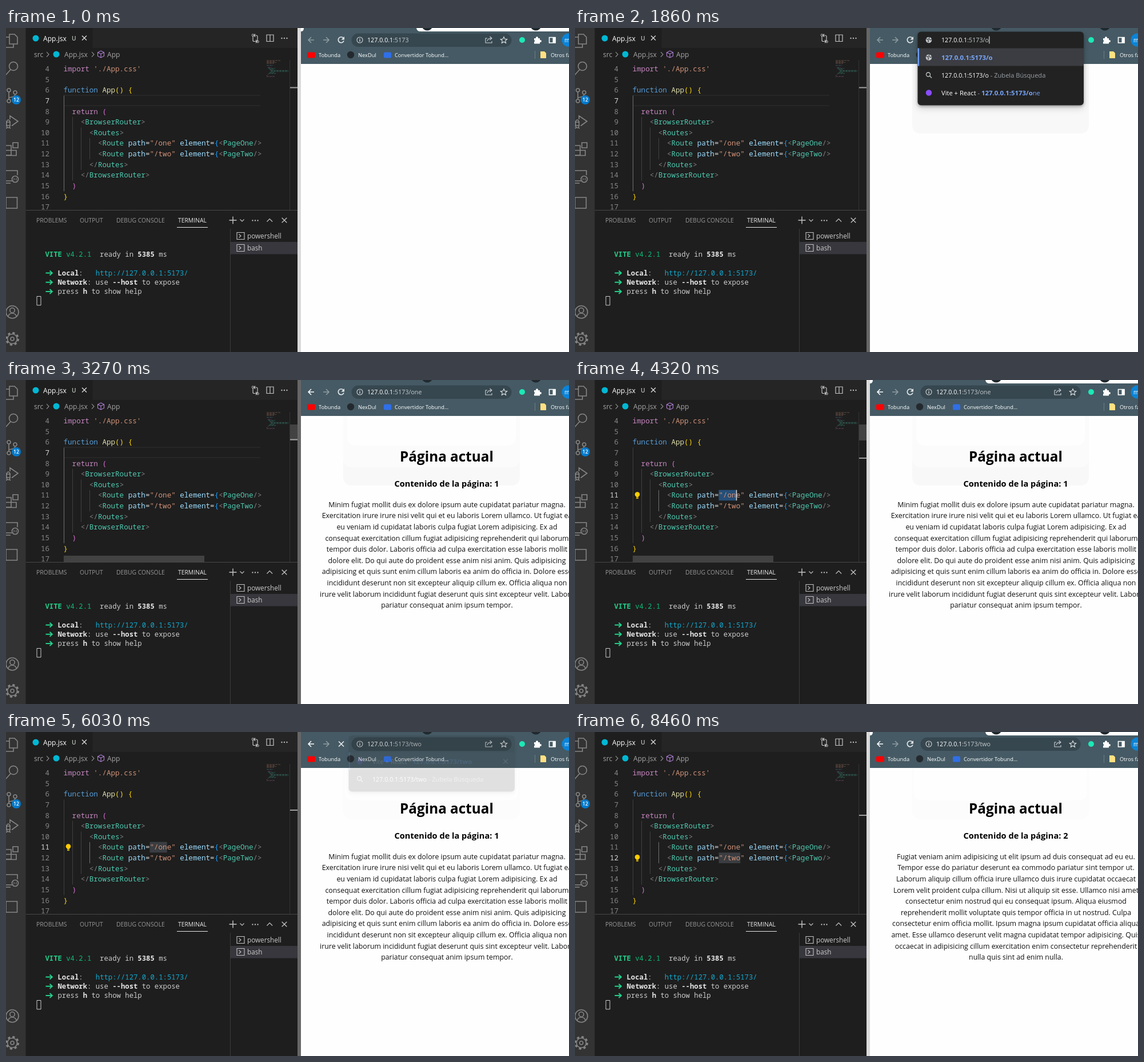
Write an HTML page that moves like this. It is 985 px wide and 568 px high and loops after 8490 ms.

```html
<!DOCTYPE html>
<html lang="es">
<head>
<meta charset="utf-8">
<title>Router demo</title>
<style>
html,body{margin:0;width:100%;height:100%;overflow:hidden;background:#1e1e1e}
svg{display:block;width:985px;height:568px}
text{white-space:pre;font-family:"Open Sans","Noto Sans",sans-serif}
.m{font-family:"Noto Sans Mono","DejaVu Sans Mono",monospace}
</style>
</head>
<body>
<svg id="stage" viewBox="0 0 985 568" xmlns="http://www.w3.org/2000/svg"></svg>
<script>
const LOOP = 8490, HOST = '127.0.0.1', PORT = ':5173', TEAL = '#455a64';
const stage = document.getElementById('stage');

const T = (x, y, s, size, fill, more = '') =>
  `<text x="${x}" y="${y}" font-size="${size}" fill="${fill}" ${more}>${s}</text>`;
const R = (x, y, w, h, fill, more = '') =>
  `<rect x="${x}" y="${y}" width="${w}" height="${h}" fill="${fill}" ${more}/>`;
const C = (x, y, r, fill, more = '') => `<circle cx="${x}" cy="${y}" r="${r}" fill="${fill}" ${more}/>`;
const ring = (x, y, r, stroke, w = 1.2, more = '') => C(x, y, r, 'none', `stroke="${stroke}" stroke-width="${w}" ${more}`);
const P = (d, stroke, w = 1.2, more = '') =>
  `<path d="${d}" fill="none" stroke="${stroke}" stroke-width="${w}" ${more}/>`;
const S = (fill, s, more = '') => `<tspan fill="${fill}" ${more}>${s}</tspan>`;
const G = (id, s = '') => `<g id="${id}">${s}</g>`;
const cross = (x, y, r, c, w = 1.3) =>
  P(`M${x - r} ${y - r}l${2 * r} ${2 * r}M${x + r} ${y - r}l${-2 * r} ${2 * r}`, c, w);
const dots = (x, y, c) => [-4.5, 0, 4.5].map(d => C(x + d, y, 1.15, c)).join('');
const bold = 'font-weight="700"', mono = 'class="m"';

// ---------- editor ----------
const CW = 7.55, LH = 18.65;
const lineY = n => 71.5 + (n - 4) * LH;
const col = n => 100.5 + n * CW;
const esc = s => s.replace(/</g, '&lt;').replace(/>/g, '&gt;');
const TONE = { k: '#c586c0', f: '#569cd6', y: '#dcdcaa', s: '#ce9178', t: '#4ec9b0', g: '#808080',
  a: '#9cdcfe', w: '#d4d4d4', o: '#ffd700', p: '#da70d6', b: '#179fff' };
const route = (path, page) => [8, 'g<', 'tRoute', 'a path', 'w=', `s"${path}"`, 'a element', 'w=', 'b{',
  'g<', 't' + page, 'g/>', 'b}', 'g/>'];
const CODE = {
  4: [0, 'kimport', "s './App.css'"],
  6: [0, 'ffunction', 'y App', 'o() {'],
  8: [2, 'kreturn', 'p ('],
  9: [4, 'g<', 'tBrowserRouter', 'g>'],
  10: [6, 'g<', 'tRoutes', 'g>'],
  11: route('/one', 'PageOne'),
  12: route('/two', 'PageTwo'),
  13: [6, 'g</', 'tRoutes', 'g>'],
  14: [4, 'g</', 'tBrowserRouter', 'g>'],
  15: [2, 'p)'],
  16: [0, 'o}']
};

function codeText() {
  return Object.entries(CODE).map(([n, [indent, ...parts]]) =>
    T(col(indent), lineY(+n) + 4.4, parts.map(p => S(TONE[p[0]], esc(p.slice(1)))).join(''), 12.58, '#d4d4d4', mono)
  ).join('');
}

function lineNumbers() {
  let s = '';
  for (let n = 4; n < 18; n++)
    s += T(76, lineY(n) + 4.4, n, 12.58, '#858585', `class="m" id="n${n}" text-anchor="end"`);
  return s;
}

const guide = (i, from, to) =>
  P(`M${Math.round(col(2 * i)) + .5} ${lineY(from) - 9}V${lineY(to) + 9.5}`, '#404040', 1, `id="g${i}"`);

function minimap() {
  const rows = [[0, 0, 24, 's'], [1, 0, 14, 's'], [2, 0, 17, 's'], [3, 0, 13, 's'], [5, 0, 11, 'f'], [7, 2, 6, 'k'],
    [8, 3, 12, 't'], [9, 5, 7, 't'], [10, 7, 31, 't'], [11, 7, 31, 't'], [12, 5, 8, 't'], [13, 3, 13, 't'],
    [14, 2, 1, 'p'], [15, 0, 1, 'o'], [16, 0, 15, 'k']];
  return rows.map(([i, x, w, c]) =>
    P(`M${456 + x} ${57 + i * 1.75}h${w}`, TONE[c], 1, 'stroke-dasharray="4 1" opacity=".38"')).join('');
}

function activityBar() {
  const c = '#868686', w = 1.6;
  return R(0, 0, 34.5, 568, '#333') +
    P('M6 11h9l5 5v12h-14zM6 16H-1v18h14v-6', c, w) +
    ring(13, 67, 7.5, c, w) + P('M8 73L-1 83', c, w) +
    ring(5, 109, 3, c, w) + ring(16, 113, 3, c, w) + ring(5, 128, 3, c, w) + P('M5 112v13M16 116q0 5-11 6', c, w) +
    C(18, 126, 8, '#007acc') + T(18, 129.3, '12', 8.6, '#fff', 'text-anchor="middle" font-weight="600"') +
    P('M7 160v-6l14 9.5-11 8M0 165h8M0 171h8M0 176l3-2M8 176l-3-2M1 164q3-6 6 0v8q-3 6-6 0z', c, w) +
    P('M-1 206h10v17h-10M-1 214.5h19v9h-19M12 201h9v9h-9z', c, w) +
    P('M11 268H-1V250H20v8M0 272h8', c, w) + ring(16, 265, 5.5, c, w) + P('M13 263l2 2-2 2M19 263l-2 2 2 2', c, 1) +
    P('M0 297h19.5v19H0z', c, w) +
    ring(11, 498, 11, c, w) + ring(11, 495, 4.2, c, w) + P('M3.5 506q2-6 7.5-6t7.5 6', c, w) +
    ring(11, 545, 8.5, c, w) + ring(11, 545, 3, c, w) + ring(11, 545, 10.5, c, 3, 'stroke-dasharray="4.1 4.15"');
}

function panel() {
  const L = '#c5c5c5';
  const row = (y, s) => P(`M404 ${y - 6}h13v12h-13zM407.5 ${y - 3}l3.5 3-3.5 3`, L, 1.1) + T(422, y + 4.2, s, 11.7, '#ccc');
  const tabs = [[53, 'PROBLEMS'], [129, 'OUTPUT'], [193, 'DEBUG CONSOLE'], [301, 'TERMINAL']];
  const term = (c, r, s) => T(53.7 + c * 7.36, 401.3 + r * 16.25, s, 12.27, '#ccc', mono);
  const arrow = r => {
    const y = 397 + r * 16.25;
    return P(`M69.5 ${y}h11M76.5 ${y - 4}l4.5 4-4.5 4`, '#23d18b', 1.8);
  };
  const B = (s, c = '#e5e5e5') => S(c, s, bold);
  return R(34.5, 319, 475.5, 249, '#1e1e1e') + R(34.5, 319, 475.5, 1, '#474747') +
    tabs.map(([x, s], i) => T(x, 341.2, s, 10.35, i == 3 ? '#e7e7e7' : '#979797')).join('') +
    R(299, 349, 54, 1, '#e7e7e7') +
    P('M390.5 337h13M397 330.5v13', L, 1.4) + P('M409.5 335.5l3.5 3.5 3.5-3.5', L, 1.1) + dots(436, 337.5, L) +
    P('M456.5 339.5l4.8-4.8 4.8 4.8', L) + cross(487, 337, 4.3, L) +
    R(392, 352, 1, 216, '#3c3c3c') + R(393, 375, 117, 21.5, '#37373d') +
    row(364.5, 'powershell') + row(385.5, 'bash') +
    term(2, 0, B('VITE', '#23d18b') + S('#0dbc79', ' v4.2.1') + '  ready in ' + B('5385') + ' ms') +
    arrow(2) + arrow(3) + arrow(4) +
    term(5, 2, B('Local') + ':   ' + S('#11a8cd', 'http://127.0.0.1:5173/')) +
    term(5, 3, B('Network') + ': use ' + B('--host') + ' to expose') +
    term(5, 4, 'press ' + B('h') + ' to show help') +
    P('M54 470.5h7v15.5h-7z', '#ccc', 1);
}

function editor() {
  const L = '#c5c5c5', react = '#00b8d4';
  const chev = x => P(`M${x - 2} 42l4 4.3-4 4.3`, '#999', 1.1);
  return R(34.5, 0, 475.5, 35, '#252526') + R(34.5, 0, 117, 35, '#1e1e1e') +
    C(52, 18, 5.5, react) + T(65, 22.5, 'App.jsx', 12.1, '#fff') + T(115, 22, 'U', 10.3, '#b5bdb5', 'font-weight="600"') +
    cross(137, 17.5, 4, '#ddd') +
    P('M432 14v7.5q0 2 2 2h5M437 21l2.5 2.5-2.5 2.5M440 23V15q0-2-2-2h-4M436 10.5l-2.5 2.5 2.5 2.5', L) +
    ring(432, 12.5, 1.8, L, 1) + ring(440.5, 24, 1.8, L, 1) +
    P('M456 12h12v11.5h-12zM462 12v11.5', L) + dots(487, 18, L) +
    T(49, 50.6, 'src', 12.1, '#a5a5a5') + chev(73) + C(88, 46, 5.5, react) +
    T(102, 50.6, 'App.jsx', 12.1, '#a5a5a5') + chev(152) +
    P('M166 40l5.5 2.8v6.4l-5.5 2.8-5.5-2.8v-6.4zM160.5 42.8l5.5 2.7 5.5-2.7M166 45.5v6.5', '#b180d7', 1.1) +
    T(177, 50.6, 'App', 12.1, '#a5a5a5') +
    `<g clip-path="url(#code)">` + lineNumbers() + P('M101 0h344M101 18h344', '#2c2c2c', 1.3, 'id="current"') +
    R(0, 0, 0, 18.6, '#264f78', 'id="sel"') +
    guide(0, 7, 15) + guide(1, 9, 14) + guide(2, 10, 13) + guide(3, 11, 12) +
    codeText() + R(0, 0, 1.6, 18.6, '#d8d8d8', 'id="caret"') +
    G('bulb', C(0, -1.5, 4.3, '#fc0') + R(-2, 2, 4, 4, '#fc0') + R(-2, 3.6, 4, .8, '#1e1e1e')) + '</g>' +
    minimap() + R(496, 56, 1, 263, '#333') +
    G('bars', R(497, 78, 13, 28, '#797979') + R(101, 308, 246, 11, '#797979')) +
    R(497, 0, 13, 2, '#a0a0a0', 'id="mark"');
}

// ---------- browser ----------
const TEXT = [[
  'Minim fugiat mollit duis ex dolore ipsum aute cupidatat pariatur magna.',
  'Exercitation irure irure nisi velit qui et eu laboris Lorem ullamco. Ut fugiat ea',
  'eu veniam id cupidatat laboris culpa fugiat Lorem adipisicing. Ex ad',
  'consequat exercitation cillum fugiat adipisicing reprehenderit qui laborum',
  'tempor duis dolor. Laboris officia ad culpa exercitation esse laboris mollit',
  'dolore elit. Do qui aute do proident esse anim nisi anim. Quis adipisicing',
  'adipisicing et quis sunt enim cillum laboris ea anim do officia in. Dolore esse',
  'incididunt deserunt non sit excepteur aliquip cillum ex. Officia aliqua non',
  'irure velit laborum incididunt fugiat deserunt quis sint excepteur velit. Labore',
  'pariatur consequat anim ipsum tempor.'
], [
  'Fugiat veniam anim adipisicing ut elit ipsum ad duis consequat ad eu eu.',
  'Tempor esse do pariatur deserunt ea commodo pariatur sint tempor ut.',
  'Laborum aliquip cillum officia irure ullamco duis irure cupidatat occaecat',
  'Lorem velit proident culpa cillum. Nisi ut aliquip sit esse. Ullamco nisi amet',
  'consectetur enim nostrud qui eu consequat ipsum. Aliqua eiusmod',
  'reprehenderit mollit voluptate quis tempor officia in ut nostrud. Culpa',
  'consectetur enim officia mollit. Ipsum magna ipsum cupidatat officia aliqua',
  'amet. Esse ullamco deserunt velit magna cupidatat tempor adipisicing. Quis',
  'occaecat in adipisicing cillum exercitation enim consectetur reprehenderit',
  'nulla quis sint ad enim nulla.'
]];

function pageText(i) {
  const mid = 'text-anchor="middle"';
  return G('page' + (i + 1), T(771, 142.5, 'Página actual', 24.3, '#000', `${mid} ${bold}`) +
    T(771, 187, 'Contenido de la página: ' + (i + 1), 14.58, '#000', `${mid} ${bold}`) +
    TEXT[i].map((s, k) => T(771.5, (222.8 + k * 19.6).toFixed(1), s, 12.38, '#111', mid)).join(''));
}

// faint card left behind on the page by the suggestion list
const ghost = (bottom, fill, inset = 0) =>
  `<path d="M${590 + inset} 63V${bottom - 16}q0 16 16 16H${883 - inset}q16 0 16-16V63z" fill="${fill}"/>`;

function browser() {
  const w = '#e8eaed', info = '#d5d9dc';
  const mark = (x, s) => T(x, 50.6, s, 9.3, '#fff');
  return R(510, 0, 6, 568, '#dadada', 'id="strip"') + R(516, 0, 469, 8, '#fff', 'id="title"') +
    C(737, -5, 9.5, '#202a2f') + C(927, -5, 9.5, '#202a2f') +
    `<path d="M516 63V6q5 0 5-6h197q1 6 7 6h260v57z" fill="${TEAL}"/>` +
    P('M539 21h-10M534 16l-5 5 5 5', '#8e9ca3', 1.5, 'id="back"') + P('M555 21h10M560 16l5 5-5 5', '#8e9ca3', 1.5) +
    G('reload', P('M590.5 18a5 5 0 1 0 .5 4.5', w, 1.7) + `<path d="M592 15v5.5h-5.5z" fill="${w}"/>`) +
    G('stop', cross(586.5, 21, 4.5, w, 1.7)) +
    R(604.5, 9.5, 280, 23.5, '#37474f', 'rx="11.7" id="omni"') +
    ring(619, 21, 5, info, 1.1) + R(618.4, 20, 1.3, 4, info) + R(618.4, 17.8, 1.3, 1.3, info) +
    R(632, 14, 72, 15, '#4a78b5', 'id="urlsel"') + G('url') + R(0, 14.5, 1, 13, '#fff', 'id="urlcaret"') +
    P('M842 18h-3v8h11v-3M842 23q1-5 7-5M846.5 15l3.5 3-3.5 3', '#c9d0d4', 1.1) +
    P('M871 15.5l1.7 3.7 4 .4-3 2.7.9 4-3.6-2.1-3.6 2.1.9-4-3-2.7 4-.4z', '#dfe3e5', 1.1) +
    C(903, 21, 5, '#1de9b6') +
    '<path d="M924 18h3.2a2 2 0 1 1 3.6 0h3.2v3.2a2 2 0 1 1 0 3.6v2.7h-10v-3a2 2 0 0 0 0-3.6z" fill="#fff"/>' +
    P('M950.5 16.5h10.5v9.5h-10.5z', '#fff', 1.6) + R(956.5, 16, 5, 10, '#fff') +
    C(984, 21, 11.5, '#0b84d8') + T(977, 24.5, 'mi', 10, '#fff') +
    R(527, 42.5, 14, 10, '#f00', 'rx="2"') + mark(547, 'Tobunda') +
    C(603, 47, 6.2, '#24292e') + mark(616, 'NexDul') +
    R(661, 42.5, 13, 10, '#2f6fe8', 'rx="2"') + mark(680, 'Convertidor Tobund...') +
    R(925, 40, 1, 14, '#6f8089') + '<path d="M935 41h7l3 3v9h-10z" fill="#ffe082"/>' + mark(953, 'Otros favoritos') +
    R(516, 63, 469, 505, '#fefefe') +
    G('ghostA', ghost(185, '#f8f8f8')) +
    G('ghostB', ghost(185, '#f8f8f8') + ghost(153, '#fbfbfb') + ghost(125, '#fafafa')) +
    G('ghostC', ghost(185, '#f8f8f8') + ghost(153, '#fbfbfb') + ghost(115, '#fefefe', 7)) +
    G('ghostD', ghost(153, '#fcfcfc') + ghost(120, '#fefefe', 3)) +
    pageText(0) + pageText(1) + G('pop', G('list') + G('entry'));
}

const urlText = (x, path) => T(x, 24.9, S('#fff', HOST) + S('#c3cacd', PORT + path), 10.7, '#fff');

// suggestions: [icon, typed part, remaining part]
function suggestions(path) {
  const search = ['search', path];
  if (path == '/') return [['vite', '', ''], search, ['vite', '/', 'one'], ['vite', '/', 'two']];
  const full = path[1] == 'o' ? '/one' : '/two';
  const hit = ['vite', path, full.slice(path.length)];
  return path == full ? [hit, search] : [['globe', path], search, hit];
}

const icons = {
  vite: y => C(619, y, 5.2, '#8a4dff'),
  globe: y => C(619, y, 5.3, '#c4c7c9') + P(`M614.5 ${y - 2}l3 1 1 3-1 2M620 ${y - 5}l-1 3 3 2 2-1`, '#44474a', 1.4),
  search: y => ring(618, y - 1, 3.5, '#c4c7c9', 1.3) + P(`M620.5 ${y + 1.5}l3.5 3.5`, '#c4c7c9', 1.4)
};

function listRows(rows) {
  const blue = '#78a7ff', dim = '#9aa0a6';
  let s = R(599.5, 6.5, 290.5, 36 + rows.length * 31, '#202124', 'rx="6" filter="url(#shadow)"') +
    R(599.5, 35.5, 290.5, 31, '#3b3d42') + R(599.5, 35.5, 2.5, 31, '#6ea0f8');
  rows.forEach(([icon, typed, rest], i) => {
    const y = 51.5 + i * 31, link = S(blue, HOST + PORT + typed, bold + ' font-size="11.38"');
    s += icons[icon](y);
    if (icon == 'search')
      s += T(641, y + 4, S('#fff', HOST + PORT + typed, 'font-size="10.7"') + ' - Zubela Búsqueda', 11.1, dim);
    else if (icon == 'globe') s += T(641, y + 4, link, 11.38, blue);
    else s += T(641, y + 4, S('#fff', 'Vite + React') + ' - ' + link + S(blue, rest), 11.2, dim);
  });
  if (rows[0][0] == 'vite') s += cross(874, 51.5, 3.8, '#d0d3d6');
  return s;
}

stage.innerHTML = `<defs><clipPath id="code"><rect x="34" y="62" width="413.5" height="257"/></clipPath>
<filter id="shadow" x="-10%" y="-10%" width="120%" height="140%">
<feDropShadow dx="0" dy="2" stdDeviation="2.5" flood-opacity=".3"/>
<feDropShadow dx="0" dy="5" stdDeviation="6" flood-opacity=".15"/></filter></defs>` +
  R(0, 0, 985, 568, '#1e1e1e') + editor() + panel() + activityBar() + browser();

// ---------- timeline ----------
const el = {};
stage.querySelectorAll('[id]').forEach(e => el[e.id] = e);
const set = (id, attrs) => { for (const k in attrs) el[id].setAttribute(k, attrs[k]); };
const show = (id, on) => set(id, { opacity: +on });
const within = (t, a, b) => t >= a && t < b;
const clamp = v => Math.max(0, Math.min(1, v));
const ramp = (t, a, b) => clamp((t - a) / (b - a));

const TYPING = [[0, null], [1350, '/'], [1860, '/o'], [2010, '/on'], [2130, '/one'], [2310, null],
  [5040, '/on'], [5130, '/o'], [5220, '/'], [5550, '/t'], [5700, '/tw'], [5820, '/two'], [6060, null]];
const CLOSED = [2220, 5970], LOADED = [2430, 6090], CLICK = [3300, 7800];
let shownPath, shownUrl;

function drawEditor(t) {
  const line = t < CLICK[0] ? 7 : t < CLICK[1] ? 11 : 12, y = lineY(line) - 9.3;
  const picked = { 7: 0, 11: 4, 12: 5 }[line], start = line == 11 ? 3480 : 8010;
  const chars = Math.floor(ramp(t, start, start + 210) * picked);
  const focused = within(t, CLICK[0], 4440) || within(t, CLICK[1], 8460);
  for (let n = 4; n < 18; n++) set('n' + n, { fill: n == line ? '#d6d6d6' : '#858585' });
  for (let i = 0; i < 4; i++) set('g' + i, { stroke: i == (line == 7 ? 0 : 3) ? '#707070' : '#404040' });
  set('current', { transform: `translate(0 ${y})`, opacity: +(chars == 0) });
  set('sel', { x: col(20), y, width: chars * CW, fill: focused ? '#264f78' : '#3a3d41' });
  set('caret', { x: col(20 + chars), y, opacity: +(focused && (t - CLICK[0]) % 1000 < 500 || within(t, 4200, 4440)) });
  set('bulb', { transform: `translate(109 ${lineY(line)})`, opacity: +(line > 7) });
  set('mark', { y: { 7: 103.5, 11: 136, 12: 145 }[line] });
  show('bars', .4 * (ramp(t, 2790, 2850) - ramp(t, 4400, 4440) + ramp(t, 6840, 6900) - ramp(t, 8130, 8220)));
}

function drawPopup(t) {
  const path = TYPING.filter(e => e[0] <= t).pop()[1];
  if (path !== shownPath) {
    const rows = path ? suggestions(path) : [];
    el.list.innerHTML = path ? listRows(rows) : '';
    el.entry.innerHTML = path ? icons[rows[0][0]](21) + urlText(641, path) : '';
    if (path) {
      const end = 641.5 + el.entry.querySelector('text').getComputedTextLength();
      el.entry.innerHTML += R(end, 14.5, 1, 13, '#fff');
    }
    shownPath = path;
  }
  const closed = CLOSED[t < 4000 ? 0 : 1];
  show('pop', 1 - ramp(t, closed, closed + 70));
  show('entry', t < closed);
}

function drawBrowser(t) {
  const active = within(t, 780, CLICK[0]) || within(t, 4440, CLICK[1]);
  set('strip', { fill: active ? '#666' : '#dadada' });
  set('title', { fill: active ? TEAL : '#fff' });

  const path = t < CLOSED[0] ? '' : t < CLOSED[1] ? '/one' : '/two';
  if (path !== shownUrl) { el.url.innerHTML = urlText(632, path); shownUrl = path; }
  const width = el.url.firstChild.getComputedTextLength();
  const editing = within(t, 780, 1350) || within(t, 4440, 5040);
  const picked = within(t, 780, 1050) || within(t, 4440, 4740);
  const hover = 9 * ramp(t, 270, 420) * (t < 780);
  set('omni', { fill: editing ? '#202124' : `rgb(${55 + hover},${71 + hover},${79 + hover})`,
    stroke: editing ? '#8ab4f8' : 'none', 'stroke-width': 1.5 });
  set('urlsel', { width, opacity: +picked });
  set('urlcaret', { x: 632.5 + width, opacity: +(editing && !picked) });

  const loading = CLOSED.some((c, i) => within(t, c, LOADED[i]));
  show('stop', loading);
  show('reload', !loading);
  set('back', { stroke: t < CLOSED[0] ? '#8e9ca3' : '#fff' });
  show('page1', within(t, LOADED[0], LOADED[1]));
  show('page2', t >= LOADED[1]);
  show('ghostA', within(t, 1350, CLOSED[0]));
  show('ghostB', within(t, CLOSED[0], LOADED[0]));
  show('ghostC', within(t, LOADED[0], CLOSED[1]));
  show('ghostD', t >= CLOSED[1]);
  drawPopup(t);
}

const begin = performance.now();
function frame(now) {
  const t = Math.max(0, now - begin) % LOOP;
  drawEditor(t);
  drawBrowser(t);
  requestAnimationFrame(frame);
}
frame(begin);
</script>
</body>
</html>
```
